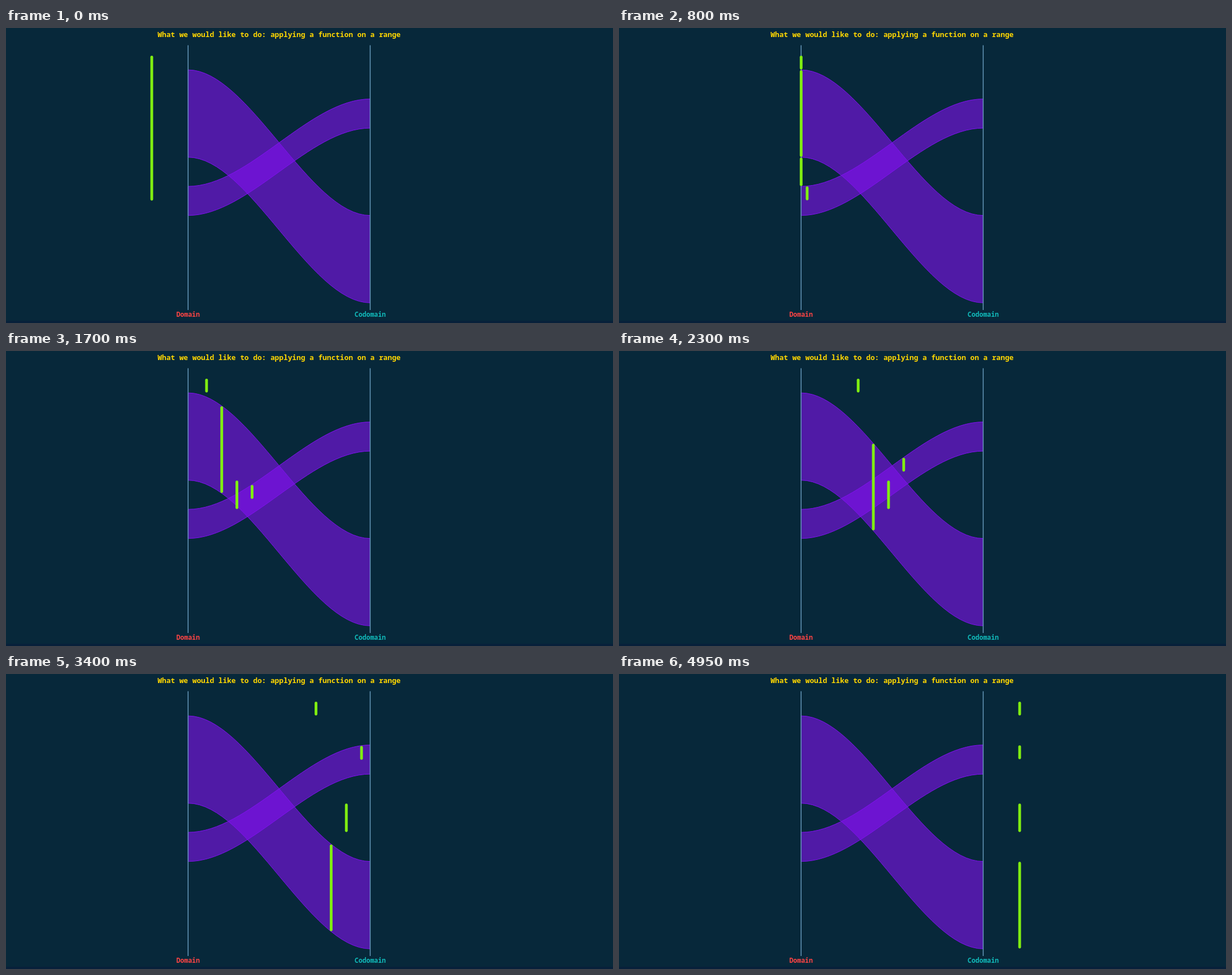
Animation, 1074 px wide and 522 px high, one loop 5 s. Source, as an HTML page:

```html
<!DOCTYPE html>
<html lang="en">
<head>
<meta charset="utf-8">
<title>Applying a function on a range</title>
<style>
  html, body { margin: 0; width: 100%; height: 100%; overflow: hidden; background: #07283a; }
  svg { display: block; width: 1074px; height: 522px; }
  text { font: bold 11.52px "Noto Sans Mono", "DejaVu Sans Mono", monospace; text-anchor: middle; }
  .title { font-size: 12.8px; fill: #ffd700; }
  .axis { stroke: #6699bb; stroke-width: 1.5; }
  .band { fill: #8011ee; fill-opacity: .6; stroke: #8011ee; }
  .bar { stroke: #80ee11; stroke-width: 4.9; stroke-linecap: round; }
</style>
</head>
<body>
<svg viewBox="0 0 1074 522">
  <rect y="518" width="1074" height="4" fill="#07203a"/>
  <text class="title" x="483.3" y="15.5">What we would like to do: applying a function on a range</text>
  <g id="bands"></g>
  <path class="axis" d="M322.2 30.5V499M644.4 30.5V499"/>
  <text x="322.2" y="510.5" fill="#ff4444">Domain</text>
  <text x="644.4" y="510.5" fill="#11bbbb">Codomain</text>
  <g id="bars"></g>
</svg>
<script>
const LEFT = 322.3, SPAN = 322.2, MARGIN = 64.4;
const LOOP = 5000, FRAME = 50;
const ENTER = 5, CROSS = 20, STAGGER = 5 / 3, UNIT = 4950 / 35;

// Pieces of the range: [start, end, shift applied by the function]
const pieces = [[-1, 0, 0], [0, 6, 10], [6, 8, 0], [8, 9, -6]];
const y = k => 74.1 + 25.76 * k;
const smooth = u => u * u * (3 - 2 * u);
const clamp = u => Math.min(1, Math.max(0, u));

function add(parent, tag, cls) {
  const el = document.createElementNS("http://www.w3.org/2000/svg", tag);
  el.setAttribute("class", cls);
  return document.getElementById(parent).appendChild(el);
}

function band(a, b, shift) {
  const [x0, x1, x2, x3] = [0, 1, 2, 3].map(i => 322.2 + i * SPAN / 3);
  const [a0, b0, a1, b1] = [a, b, a + shift, b + shift].map(y);
  add("bands", "path", "band").setAttribute("d",
    `M${x0} ${a0}C${x1} ${a0} ${x2} ${a1} ${x3} ${a1}` +
    `V${b1}C${x2} ${b1} ${x1} ${b0} ${x0} ${b0}Z`);
}
band(0, 6, 10);
band(8, 10, -6);

const bars = pieces.map(() => add("bars", "line", "bar"));

function place(bar, x, top, bottom) {
  const set = { x1: x, x2: x, y1: top + 3, y2: bottom - 3 };
  for (const key in set) bar.setAttribute(key, set[key]);
}

function draw(now) {
  const t = Math.floor(now % LOOP / FRAME) * FRAME / UNIT;
  const whole = t < ENTER;
  const enter = clamp(t / ENTER), leave = clamp((t - 30) / ENTER);
  pieces.forEach(([a, b, shift], i) => {
    const u = clamp((t - ENTER - (3 - i) * STAGGER) / CROSS);
    const x = LEFT + MARGIN * (enter - 1 + leave) + SPAN * u;
    const dy = y(shift * smooth(u)) - y(0);
    bars[i].style.display = whole && i ? "none" : "";
    place(bars[i], x, y(a) + dy, y(whole ? 9 : b) + dy);
  });
  requestAnimationFrame(draw);
}
requestAnimationFrame(draw);
</script>
</body>
</html>
```
